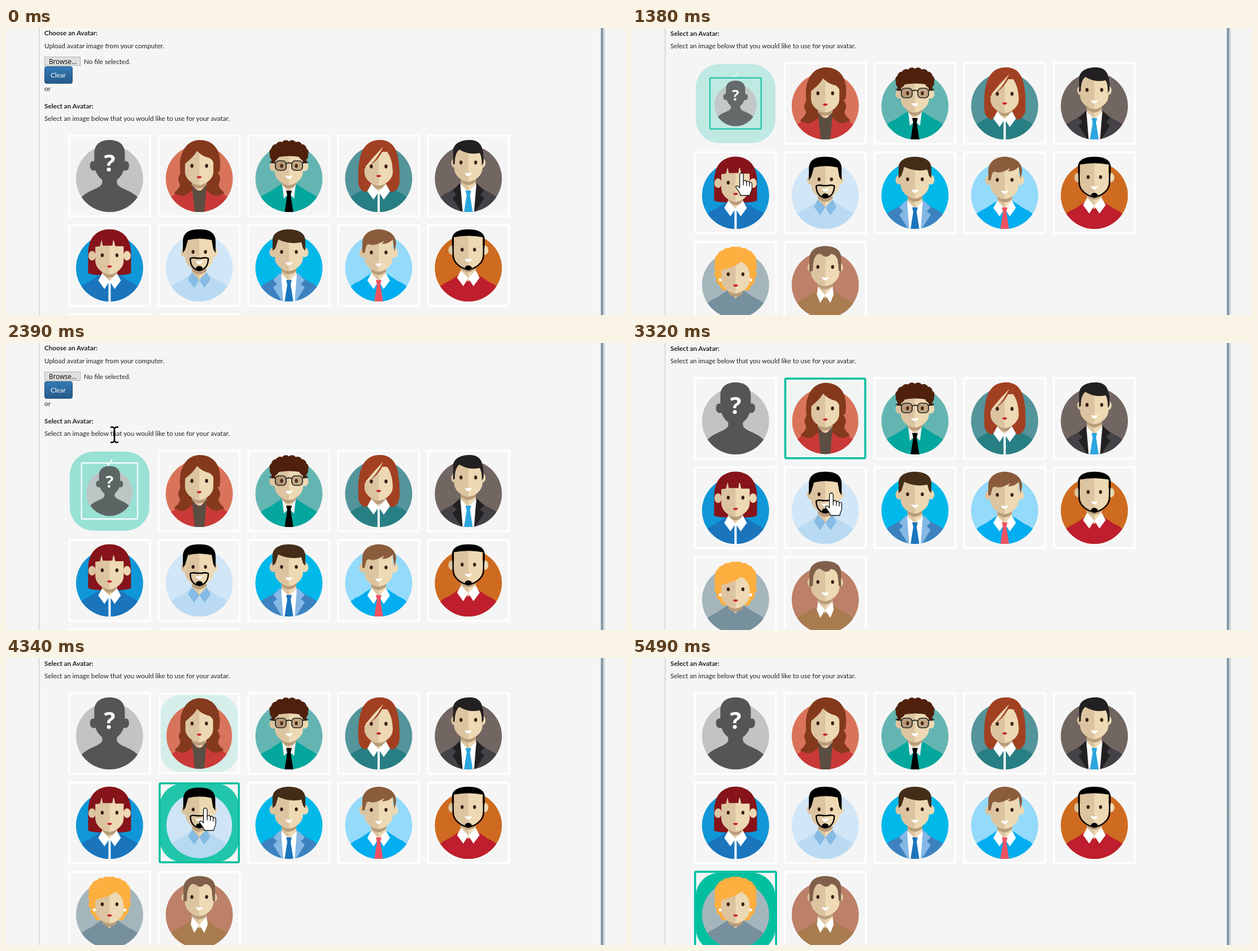
Recreate the animation shown at these times as an HTML page. Size 1098x510 px, loop 6.57 s.

```html
<!DOCTYPE html>
<html lang="en">
<head>
<meta charset="utf-8">
<title>Choose an Avatar</title>
<style>
html, body { margin: 0; width: 100%; height: 100%; overflow: hidden; background: #f5f5f5; }
svg { display: block; }
text { font-family: Lato, Carlito, sans-serif; font-size: 11.7px; fill: #222; }
.b { font-weight: bold; }
</style>
</head>
<body>
<svg id="stage" width="1098" height="510" viewBox="0 0 1098 510"></svg>
<script>
const LOOP = 6570, SCROLL = 129, TEAL = '#02bf9f';
const LIGHT = '#edd9b3', TAN = '#dcc4a0', SHADE = '#b99c79';

// ---- drawing helpers
const path = (d, fill, extra = '') => `<path d="${d}" fill="${fill}" ${extra}/>`;
const line = (d, color, w) => path(d, 'none', `stroke="${color}" stroke-width="${w}" stroke-linejoin="round"`);
const oval = (x, y, rx, ry, fill) => `<ellipse cx="${x}" cy="${y}" rx="${rx}" ry="${ry}" fill="${fill}"/>`;
const disc = fill => oval(0, 4.7, 59.4, 59.4, fill);
const both = s => s + `<g transform="scale(-1 1)">${s}</g>`;
const clip = s => `<g clip-path="url(#disc)">${s}</g>`;
const text = (x, y, s, extra = '') => `<text x="${x}" y="${y}" ${extra}>${s}</text>`;
const curls = (n, from, to, cy, rx, ry, r, fill) => Array.from({length: n}, (_, i) => {
  const a = (from + (to - from) * i / (n - 1)) * Math.PI / 180;
  return oval(Math.cos(a) * rx, cy + Math.sin(a) * ry, r, r, fill);
}).join('');

// ---- clothing
const collar = (c = '#fff', dy = 0, w = 20) =>
  `<g transform="translate(0 ${dy})">${both(path(`M-13 14L0 28L-9 42L-${w} 27Z`, c))}</g>`;
const tie = c => path('M-5 26H5L3 34L8 66H-8L-3 34Z', c);
const shirt = path('M-14 14L0 28L14 14L12 66H-12Z', '#fff');
const lapels = c => both(path('M-15 13L-28 26L-21 33L-28 39L-11 66H-10L-13 28Z', c));
const zip = path('M-2 28H2V66H-2Z', '#fff');

// ---- one portrait; ey is the eye line, my the mouth line
function person({bg, body, back = '', dress = '', front, ey, my, ex = 13, ear = 28, lips}) {
  const jaw = 'V10C-25 24 -10 34 0 34';
  const face = path(`M-25 -26${jaw}S25 24 25 10V-26Z`, LIGHT) + path(`M-25 -26${jaw}V-26Z`, TAN);
  const neck = path('M-13 0V15L0 29L13 15V0Z', LIGHT) + path('M-13 0V15L0 29V0Z', TAN) +
    path(`M-13 ${ey + 28}H13V${ey + 34}Q0 ${ey + 46} -13 ${ey + 34}Z`, SHADE);
  const ears = ear ? oval(-ear, 1, 6.5, 8.5, TAN) + oval(ear, 1, 6.5, 8.5, LIGHT) : '';
  const mouth = lips ? path('M-4.5 0Q-2 -3 0 -1.5Q2 -3 4.5 0Q0 4.5 -4.5 0Z', '#c8202f')
    : path('M-6.5 -2Q0 0 6.5 -2Q4 4 0 4Q-4 4 -6.5 -2Z', '#fff');
  return disc(bg) +
    clip(path('M-70 70C-58 40 -46 33 -34 28L-13 14H13L34 28C46 33 58 40 70 70Z', body)) +
    back + neck + clip(dress) +
    `<g transform="translate(0 ${ey})">${ears}${face}${both(oval(ex, 0, 2.7, 3.4, '#3a1f12'))}</g>` +
    `<g transform="translate(0 ${my})">${mouth}</g>` + front;
}

const unknown = disc('#c3c3c3') +
  clip(path('M-70 70C-58 44 -52 38 -40 30C-28 23 -14 20 -13 12V0H13V12C14 20 28 23 40 30C52 38 58 44 70 70Z', '#555')) +
  path('M-27 -26V-40C-27 -58 -14 -64 0 -64S27 -58 27 -40V-26C37 -30 38 -6 25 -10C20 4 10 11 0 11S-20 4 -25 -10C-38 -6 -37 -30 -27 -26Z', '#555') +
  text(0, -8, '?', 'text-anchor="middle" style="font:bold 42px Open Sans,sans-serif;fill:#fff"');

const glasses = both(
  '<rect x="5" y="-27" width="19" height="17" rx="6" fill="#6b432855" stroke="#222" stroke-width="1.7"/>' +
  line('M24 -23L34 -25', '#222', 2)) + line('M-5 -22Q0 -25 5 -22', '#222', 2);

const chin = y => path(`M-6 ${y}Q0 ${y - 6} 6 ${y}Q5 ${y + 6} 0 ${y + 6}Q-5 ${y + 6} -6 ${y}Z`, '#000');

const portraits = [
  unknown,
  person({bg: '#d9745a', body: '#c93937', ey: -18, my: 2, ear: 0, lips: 1,
    back: both(path('M0 -60C-28 -58 -38 -30 -32 -16C-28 -8 -38 -2 -37 6C-37 12 -31 14 -37 22C-40 27 -46 29 -43 32C-37 32 -36 36 -28 35C-18 33 -14 24 0 16Z', '#84391c')),
    dress: path('M-13 16Q0 36 13 16L9 66H-8Z', '#5b4d41'),
    front: path('M-30 8C-38 -10 -38 -62 0 -64C30 -64 41 -40 36 -8L27 -4C28 -22 25 -28 18 -32C8 -34 0 -40 -4 -45C-8 -36 -18 -28 -25 -22L-26 0Z', '#84391c')}),
  person({bg: '#64b5b2', body: '#04a79d', ey: -18, my: 1,
    dress: path('M-12 15L0 29L12 15L9 40L0 31L-9 40Z', '#f2f2f2') + tie('#000'),
    front: path('M-31 -22V-40Q-26 -60 0 -60Q26 -60 31 -40V-22L25 -24L22 -33Q0 -38 -22 -33L-25 -24Z', '#4f210d') +
      curls(10, 165, 375, -40, 27, 16, 8, '#4f210d') + glasses}),
  person({bg: '#54949b', body: '#287f83', ey: -17, my: 0, ear: 0, lips: 1,
    back: path('M-36 10C-38 -40 -26 -64 2 -64C30 -64 38 -40 37 10C36 22 30 28 22 29L13 16H-13L-22 29C-32 26 -36 20 -36 10Z', '#a24022'),
    dress: collar() + zip,
    front: path('M-28 8C-34 -44 -20 -64 4 -64C26 -62 34 -40 29 8L25 0C26 -24 20 -40 9 -50C4 -34 -10 -20 -26 -13Z', '#a24022') +
      path('M-23 -14Q-6 -24 8 -52Q-8 -36 -23 -17Z', LIGHT)}),
  person({bg: '#726662', body: '#444246', ey: -24, my: -4, ear: 24,
    dress: shirt + lapels('#222021') + tie('#2ba6de'),
    front: path('M-27 -20V-45C-26 -60 -10 -64 2 -64C20 -64 28 -54 27 -24L24 -18C24 -30 23 -36 20 -41C8 -38 -4 -40 -16 -47C-22 -42 -24 -34 -24 -22Z', '#232021')}),
  person({bg: '#1097d8', body: '#1a75bc', ey: -18, my: 2, ear: 31, lips: 1,
    back: path('M-38 14V-20C-38 -52 -20 -64 0 -64S38 -52 38 -20V14Q22 20 0 15Q-22 20 -38 14Z', '#86141a'),
    dress: collar() + zip,
    front: path('M-33 -28C-36 -52 -18 -64 0 -64S36 -52 33 -28L25 -34H10L7 -48L5 -35H-12L-14 -46L-17 -34L-25 -33Z', '#86141a')}),
  person({bg: '#d1e6f7', body: '#b9daf2', ey: -24, my: -6, ex: 11, ear: 26,
    dress: collar('#85bbe4', -2),
    front: path('M-29 -22V-42C-29 -61 -14 -64 0 -64S29 -61 29 -42V-22L25 -28L22 -45Q0 -50 -20 -45L-25 -28Z', '#000') +
      line('M-16 -12C-10 -16 -4 -11 0 -13C4 -11 10 -16 16 -12C16 0 10 8 0 9C-10 8 -16 0 -16 -12Z', '#000', 2.4) + chin(4)}),
  person({bg: '#00b8ea', body: '#3d82bf', ey: -24, my: -4,
    dress: shirt + lapels('#85b8e5') + tie('#1b75bc'),
    front: path('M-29 -26V-46C-28 -60 -12 -64 0 -64S29 -60 29 -44V-26L25 -30L22 -41C8 -38 -6 -40 -19 -46L-24 -30Z', '#432d18')}),
  person({bg: '#94dafa', body: '#02aeef', ey: -23, my: -2,
    dress: collar() + tie('#ef5362'),
    front: path('M-29 -22V-40C-28 -58 -12 -64 0 -64S31 -58 31 -38L28 -24L25 -46Q18 -38 6 -38L10 -44Q-2 -36 -12 -36Q-20 -40 -22 -34L-25 -22Z', '#8b5c3c')}),
  person({bg: '#ce6b20', body: '#be1e2d', ey: -28, my: -10, ex: 11, ear: 29,
    dress: collar('#fff', -5),
    front: path('M-29 -30V-46C-29 -60 -14 -64 0 -64S29 -60 29 -46V-30L26 -50Q0 -55 -26 -50Z', '#000') +
      line('M-27 -50V-18C-27 -3 -10 7 0 7C10 7 27 -3 27 -18V-50', '#000', 2.4) + chin(3)}),
  person({bg: '#a4b6bc', body: '#77909d', ey: -14, my: 6, ear: 0, lips: 1,
    back: curls(15, 130, 410, -20, 29, 34, 9, '#fdaf40'),
    front: path('M-31 -8C-37 -50 -14 -62 4 -60C26 -58 35 -40 31 -8L25 -12C24 -26 18 -32 10 -36C0 -28 -14 -24 -24 -22Z', '#fdaf40') +
      curls(10, 175, 365, -36, 29, 19, 8.5, '#fdaf40') + both(oval(27, -4, 2.6, 2.6, '#fff'))}),
  person({bg: '#bd8069', body: '#a97c50', ey: -27, my: -7, ear: 25,
    dress: collar('#fff', -5, 15),
    front: path('M-28 -18V-44C-26 -60 -12 -64 0 -64S28 -60 28 -44V-18L24 -20L22 -40Q18 -50 10 -50Q4 -42 -4 -47Q-12 -54 -17 -46Q-22 -40 -22 -20Z', '#80604a')})
];

const card = (art, i) => `<g class="card" transform="translate(${183.4 + 158.85 * (i % 5)} ${263 + 158.8 * Math.floor(i / 5)})">
  <rect class="fill" x="-70.5" y="-70" width="141" height="140.5" rx="42" fill="${TEAL}" opacity="0"/>
  <path class="tick" d="M-5 -50L-2 -46L5 -57" fill="none" stroke="#fff" stroke-width="2" opacity="0"/>
  <g class="art"><rect class="edge" x="-71.7" y="-71.7" width="143.4" height="143.4" rx="2" fill="none" stroke="#fff" stroke-width="3.6"/>${art}</g></g>`;

const stage = document.getElementById('stage');
stage.innerHTML = `<defs>
  <clipPath id="disc"><circle cy="4.7" r="59.4"/></clipPath>
  <linearGradient id="blue" x2="0" y2="1"><stop stop-color="#337ab7"/><stop offset="1" stop-color="#265a88"/></linearGradient>
  <linearGradient id="soft"><stop stop-color="#b4c0c9"/><stop offset="1" stop-color="#f5f5f5"/></linearGradient></defs>
  <rect width="1098" height="510" fill="#f5f5f5"/>
  <rect x="58" width="1.3" height="510" fill="#cbcbcb"/>
  <rect x="1053.5" width="3.5" height="510" fill="#7d909f"/><rect x="1057" width="5" height="510" fill="url(#soft)"/>
  <g id="page">
  ${text(68, 13, 'Choose an Avatar:', 'class="b"')}
  ${text(68, 36, 'Upload avatar image from your computer.')}
  <rect x="68.5" y="51.5" width="63" height="15" fill="#e1e1e1" stroke="#adadad"/>
  ${text(76, 63.5, 'Browse...', 'style="font:11.7px Open Sans,sans-serif;fill:#000"')}
  ${text(138, 63.5, 'No file selected.')}
  <rect x="68.5" y="68.5" width="49" height="30" rx="3" fill="url(#blue)" stroke="#245580"/>
  ${text(79, 88, 'Clear', 'style="fill:#fff"')}
  ${text(68, 112, 'or')}
  ${text(68, 142.5, 'Select an Avatar:', 'class="b"')}
  ${text(68, 165, 'Select an image below that you would like to use for your avatar.')}
  ${portraits.map(card).join('')}
  </g>
  <g id="pointer">
    <g id="hand" stroke="#111" stroke-width="1.3" stroke-linejoin="round" stroke-linecap="round">
      <path fill="#fff" d="M-3.3 3A3.3 3.3 0 0 1 3.3 3V15C4 12 9 12 9 16C10 13 14 14 14 17.5C15 15.5 18.5 16 18.5 19.5V27C18.5 32 15 34 15 39.5H-2C-2 35 -6 32 -10 25.5C-11 22 -7 21 -3.3 26Z"/>
      <path fill="none" d="M3.3 15V21M9 16V22M14 18V23"/></g>
    <path id="beam" d="M-7 -13.5H-3L0 -11.5L3 -13.5H7M0 -12V12M-7 13.5H-3L0 11.5L3 13.5H7" fill="none" stroke="#000" stroke-width="2.5"/>
  </g>`;

// ---- timing
const $ = id => document.getElementById(id);
const cards = [...document.querySelectorAll('.card')].map(c =>
  ['fill', 'tick', 'art', 'edge'].map(k => c.querySelector('.' + k)));

// recorded runs: first step, last step, number of steps
const runs = [[450, 910, 7], [1060, 1140, 2], [1380, 1380, 1], [1460, 2030, 8], [2240, 2390, 3], [2470, 2550, 2],
  [2700, 3090, 6], [3320, 3630, 5], [4100, 4340, 4], [4410, 4720, 5], [4800, 4800, 1], [4990, 5100, 3], [5180, 5490, 5]];
// card: time switched on, time switched off
const picks = {0: [1314, 2204], 1: [3314, 4079], 6: [4079, 4974], 10: [4974, Infinity]};
const trail = [[450, 705, 492], [530, 605, 476], [605, 460, 432], [680, 315, 368], [757, 210, 310], [833, 166, 284],
  [910, 188, 279], [1000, 188, 279], [1140, 194, 258], [1640, 194, 258], [1800, 194, 220], [2030, 192, 163], [2640, 192, 163],
  [2860, 250, 228], [3010, 338, 302], [3090, 353, 267], [4410, 353, 267], [4570, 300, 365],
  [4720, 216, 437], [4800, 208, 434], [5335, 208, 434], [5412, 245, 486], [5490, 300, 560]];

function snap(t) {
  let out = 0;
  for (const [a, b, n] of runs) {
    if (t < a) break;
    const step = n > 1 ? (b - a) / (n - 1) : 1;
    out = a + step * Math.min(n - 1, Math.floor((t - a) / step + 1e-6));
  }
  return out;
}

// CSS "ease"
function ease(x) {
  const bez = (s, a, b) => 3 * (1 - s) ** 2 * s * a + 3 * (1 - s) * s * s * b + s ** 3;
  let lo = 0, hi = 1;
  for (let i = 0; i < 18; i++) {
    const mid = (lo + hi) / 2;
    if (bez(mid, .25, .25) < x) lo = mid; else hi = mid;
  }
  return bez(lo, .1, 1);
}

function drawCard(i, t) {
  const [on, off] = picks[i], [fill, tick, art, edge] = cards[i];
  const picked = t >= on && t < off;
  const p = t < on ? 1 : Math.min(1, (t - (picked ? on : off)) / 300);
  const alpha = t < on ? 0 : picked ? p : 1 - p;
  const size = p < .5 ? 1 - .5 * ease(2 * p) : .5 + .5 * ease(2 * p - 1);
  fill.setAttribute('opacity', alpha);
  tick.setAttribute('opacity', Math.min(1, alpha * 2.5));
  art.setAttribute('transform', `scale(${size})`);
  art.setAttribute('opacity', 1 - .4 * (1 - size));
  edge.setAttribute('stroke', picked ? TEAL : '#fff');
}

function drawPointer(t, down) {
  const k = trail.findIndex(s => s[0] > t);
  $('pointer').style.display = k > 0 ? '' : 'none';
  if (k < 1) return;
  const [a, x, y] = trail[k - 1], [b, x2, y2] = trail[k], u = (t - a) / (b - a);
  const py = y + (y2 - y) * u, beam = !down && py < 187;
  $('pointer').setAttribute('transform', `translate(${x + (x2 - x) * u} ${py})`);
  $('beam').style.display = beam ? '' : 'none';
  $('hand').style.display = beam ? 'none' : '';
}

function frame() {
  const t = snap(performance.now() % LOOP);
  const down = (t >= 1314 && t < 2204) || t >= 3310;
  $('page').setAttribute('transform', `translate(0 ${down ? -SCROLL : 0})`);
  Object.keys(picks).forEach(i => drawCard(i, t));
  drawPointer(t, down);
  requestAnimationFrame(frame);
}
frame();
</script>
</body>
</html>
```
